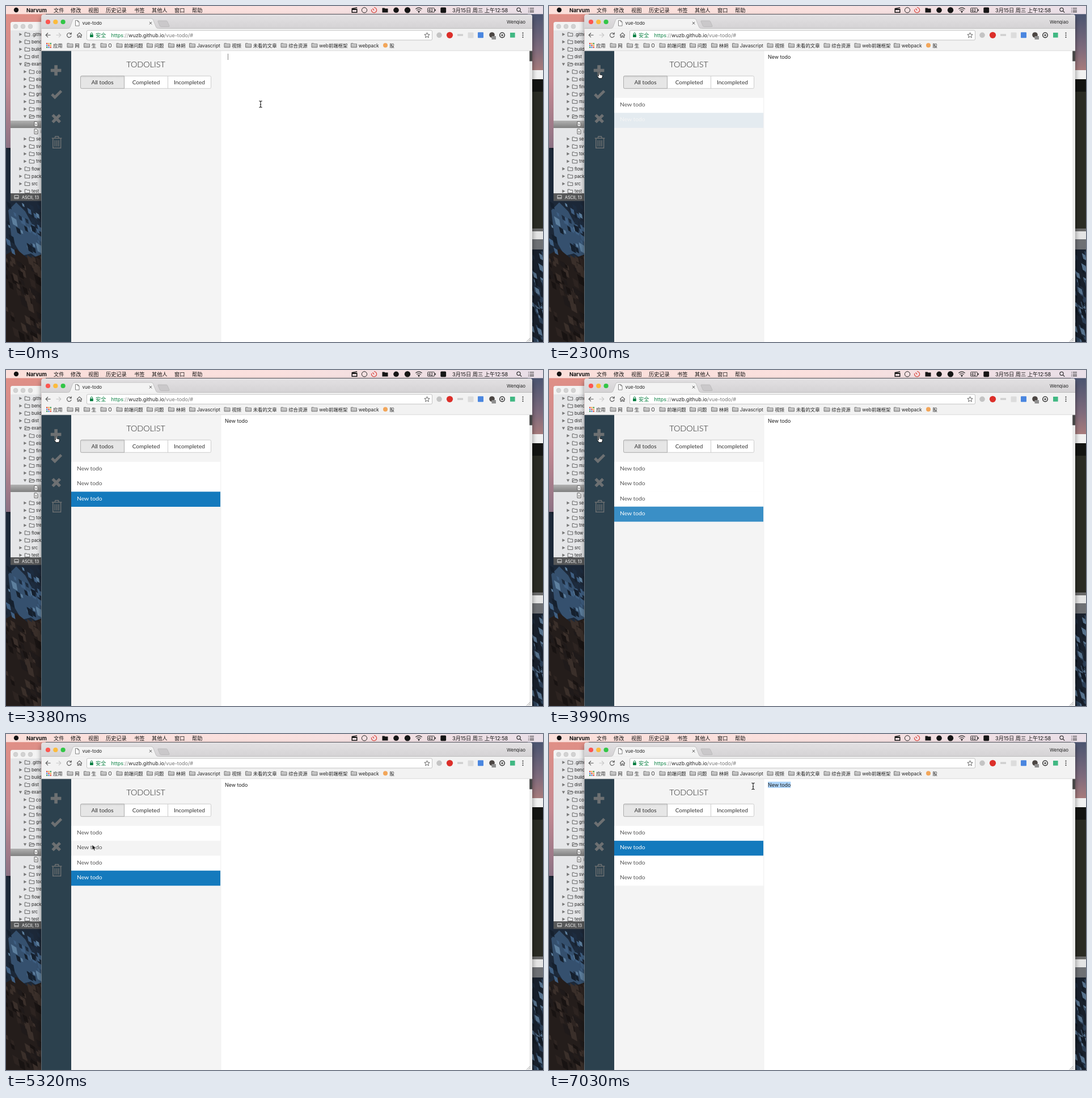
These frames come from a looping animation (947 by 592 pixels, 8 s). An HTML page:

```html
<!DOCTYPE html>
<html lang="zh">
<head>
<meta charset="utf-8">
<title>vue-todo</title>
<style>
html, body { margin: 0; width: 100%; height: 100%; overflow: hidden; background: #fff; }
svg { display: block; width: 947px; height: 592px; }
text { font-family: Inter, "Noto Sans CJK SC", "Noto Sans CJK", sans-serif; fill: #222; white-space: pre; }
.menu { font-size: 9.2px; fill: #111; }
.mark { font-size: 8.4px; }
.tree { font-size: 7.6px; fill: #222; }
.app { font-family: Lato, "Open Sans", sans-serif; font-size: 10.1px; fill: #333; }
.line { fill: none; stroke: #555; stroke-width: 1.1; }

/* every timeline spans the same 8 s loop */
.t { animation: 8s step-end infinite; }
#cursor { animation: path 8s linear infinite; }
#beam { animation-name: beam; }
#arrow { animation-name: arrow; }
#hand { animation-name: hand; }
#caret { animation-name: caret; }
#note { animation-name: note; }
#status { animation-name: status; }
#pick { animation-name: pick; }

@keyframes path {
  0% { transform: translate(449px, 173px); }
  1.5% { transform: translate(449px, 173px); animation-timing-function: steps(3, start); }
  6% { transform: translate(250px, 148px); animation-timing-function: steps(4, start); }
  12% { transform: translate(92.5px, 123.5px); animation-timing-function: steps(2, start); }
  15% { transform: translate(90px, 122px); }
  52.875% { transform: translate(90px, 122px); animation-timing-function: steps(3, start); }
  57.375% { transform: translate(121px, 159px); animation-timing-function: steps(4, start); }
  63.375% { transform: translate(126px, 183px); }
  66.5% { transform: translate(126px, 183px); animation-timing-function: step-start; }
  68% { transform: translate(152px, 195px); }
  69.5% { transform: translate(152px, 195px); animation-timing-function: steps(3, start); }
  74% { transform: translate(402px, 165px); }
  75.625% { transform: translate(402px, 165px); animation-timing-function: step-start; }
  77.125% { transform: translate(434px, 149px); animation-timing-function: steps(2, start); }
  80.125% { transform: translate(432px, 95px); }
  81.75% { transform: translate(432px, 95px); animation-timing-function: steps(3, start); }
  86.25% { transform: translate(372px, 93px); }
  87.875% { transform: translate(372px, 93px); animation-timing-function: step-start; }
  89.375%, 100% { transform: translate(360px, 92px); }
}
@keyframes beam { 0% { opacity: 1; } 3% { opacity: 0; } 72.5%, 100% { opacity: 1; } }
@keyframes arrow { 0% { opacity: 0; } 3% { opacity: 1; } 10.5% { opacity: 0; } 55.875% { opacity: 1; } 72.5%, 100% { opacity: 0; } }
@keyframes hand { 0% { opacity: 0; } 10.5% { opacity: 1; } 55.875%, 100% { opacity: 0; } }
@keyframes caret { 0% { opacity: 1; } 6% { opacity: 0; } 12% { opacity: 1; } 18.125%, 100% { opacity: 0; } }
@keyframes note { 0% { opacity: 0; } 18.125%, 100% { opacity: 1; } }
@keyframes status { 0% { opacity: 0; } 54.375% { opacity: 1; } 58.875% { opacity: 0; } 71% { opacity: 1; } 75.625%, 100% { opacity: 0; } }
@keyframes pick {
  0% { transform: translateX(42px); }
  81.75% { transform: translateX(26px); }
  83.25% { transform: translateX(6px); }
  84.75%, 100% { transform: translateX(0); }
}
/* rows fade in with an eased half second */
@keyframes add1 { 0% { opacity: 0; } 18.125% { opacity: .07; } 19.625% { opacity: .53; } 21.125% { opacity: .83; } 22.625% { opacity: .97; } 24.125%, 100% { opacity: 1; } }
@keyframes add2 { 0% { opacity: 0; } 28.75% { opacity: .07; } 30.25% { opacity: .53; } 31.75% { opacity: .83; } 33.25% { opacity: .97; } 34.75%, 100% { opacity: 1; } }
@keyframes add3 { 0% { opacity: 0; } 36.25% { opacity: .07; } 37.75% { opacity: .53; } 39.25% { opacity: .83; } 40.75% { opacity: .97; } 42.25%, 100% { opacity: 1; } }
@keyframes add4 { 0% { opacity: 0; } 46.875% { opacity: .07; } 48.375% { opacity: .53; } 49.875% { opacity: .83; } 51.375% { opacity: .97; } 52.875%, 100% { opacity: 1; } }
@keyframes on1 { 0% { opacity: 1; } 28.75%, 100% { opacity: 0; } }
@keyframes on2 { 0% { opacity: 1; } 36.25% { opacity: 0; } 69.5%, 100% { opacity: 1; } }
@keyframes on3 { 0% { opacity: 1; } 46.875%, 100% { opacity: 0; } }
@keyframes on4 { 0% { opacity: 1; } 69.5%, 100% { opacity: 0; } }
@keyframes hover2 { 0% { fill: #fff; } 55.875% { fill: #f4f4f4; } 69.5%, 100% { fill: #fff; } }
</style>
</head>
<body>
<svg viewBox="0 0 947 592">
  <defs>
    <linearGradient id="sky" x2="0" y2="1">
      <stop offset="0" stop-color="#e08f86"/><stop offset=".5" stop-color="#c58a92"/><stop offset="1" stop-color="#8c7284"/>
    </linearGradient>
    <linearGradient id="dusk" x2="0" y2="1">
      <stop offset="0" stop-color="#4a5470"/><stop offset=".6" stop-color="#7d6a7c"/><stop offset="1" stop-color="#a87c7c"/>
    </linearGradient>
    <linearGradient id="bar"><stop offset="0" stop-color="#fbdfda"/><stop offset=".5" stop-color="#fae0de"/><stop offset="1" stop-color="#e9dfe8"/></linearGradient>
    <linearGradient id="tabs" x2="0" y2="1"><stop offset="0" stop-color="#e3e1e3"/><stop offset="1" stop-color="#d4d2d4"/></linearGradient>
    <linearGradient id="focus" x2="0" y2="1"><stop offset="0" stop-color="#b2b2b2"/><stop offset="1" stop-color="#808080"/></linearGradient>
    <linearGradient id="press" x2="0" y2="1"><stop offset="0" stop-color="#d4d4d4"/><stop offset=".18" stop-color="#e6e6e6"/></linearGradient>
    <filter id="shade" x="-10%" y="-10%" width="120%" height="120%"><feDropShadow dx="0" dy="4" stdDeviation="5" flood-opacity=".45"/></filter>
    <clipPath id="side"><path d="M0 28H62.5V344H0z"/></clipPath>
    <g id="dir"><path d="M-4.3 3.2V-3.2H-1.2L-.2 -2H4.3V3.2z" fill="none" stroke="#555" stroke-width=".9"/></g>
    <g id="dirOpen"><path d="M-4.3 3V-3.2H-1.2L-.2 -2H3.6V-.6M-4.3 3L-2.6-.6H5.2L3.6 3z" fill="none" stroke="#555" stroke-width=".9"/></g>
    <g id="mdir"><path d="M-5 3.6V-3.4H-1.4L-.4-2.4H5V3.6z" fill="#bdbdbd" stroke="#6c6c6c" stroke-width=".9"/><path d="M-4.5-1.1H4.5" stroke="#eee" stroke-width=".7"/></g>
    <g id="file"><path d="M-3-4.3H1L3-2.3V4.3H-3z" fill="#f2f2f2" stroke="#555" stroke-width=".9"/><path d="M-1.5-.6L1.3 2M1.3-.6L-1.5 2" stroke="#666" stroke-width=".8"/></g>
  </defs>

  <!-- desktop -->
  <rect width="947" height="592" fill="#18202c"/>
  <rect y="14" width="70" height="236" fill="url(#sky)"/>
  <path d="M0 250L20 262 70 240V460H0z" fill="#1c2838"/>
  <path d="M4 360L18 346 34 362 50 392 62 410V448L44 436 28 440 10 410z" fill="#35506e"/>
  <path d="M0 438L18 428 40 446 62 438V592H0z" fill="#241d1b"/>
  <g id="rocks"></g>
  <rect x="920" y="14" width="27" height="100" fill="url(#dusk)"/>

  <!-- window behind, right -->
  <rect x="920" y="113" width="27" height="16" fill="#f1f1f1"/>
  <rect x="920" y="129" width="27" height="22" fill="#131412"/>
  <rect x="920" y="151" width="27" height="241" fill="#2a2b24"/>
  <rect x="920" y="392" width="27" height="5" fill="#6a6a6a"/>
  <rect x="920" y="397" width="27" height="14" fill="#e4e4e4"/>
  <rect x="920" y="411" width="27" height="18" fill="#6e7074"/>

  <!-- window behind, left -->
  <g clip-path="url(#side)">
    <path d="M8 343V32Q8 28 12 28H70V343z" fill="#e5e6e8"/>
    <path d="M8 43V32Q8 28 12 28H70V43z" fill="#f3f3f3"/>
    <g fill="#d2d2d2" stroke="#c2c2c2" stroke-width=".6"><circle cx="17" cy="36" r="3.9"/><circle cx="30" cy="36" r="3.9"/><circle cx="43" cy="36" r="3.9"/></g>
    <rect x="8" y="202" width="60" height="13" fill="url(#focus)"/>
    <g id="tree"></g>
    <rect x="8" y="330" width="60" height="13.5" fill="#575859"/>
    <path d="M15 333.5H22V339.5H15zM15 337.6H22" fill="none" stroke="#ddd" stroke-width=".9"/>
    <text x="28" y="339.6" style="font-size:7.2px;fill:#fff">ASCII, 13</text>
  </g>

  <!-- menu bar -->
  <rect width="947" height="14.3" fill="url(#bar)"/>
  <circle cx="18" cy="7" r="4.2" fill="#111"/>
  <text class="menu" x="36" y="10.5" font-weight="700">Narvum</text>
  <g id="menus"></g>
  <g fill="#151515">
    <path d="M609.5 5H619.5V12H609.5zM609.5 4L619 2.2 619.3 3.8 609.8 5.4z"/>
    <path d="M611 7H618V10.5H611z" fill="#f3dfe2"/>
    <circle cx="632" cy="7.3" r="4.6" fill="none" stroke="#222"/>
    <path d="M649 2.6A4.6 4.6 0 1 1 644.6 6M649 7.5L646.5 4.5" fill="none" stroke="#d8453e" stroke-width="1.2"/>
    <path d="M663.5 11.5V3.5H667.5L668.5 4.6H673.5V11.5z"/>
    <circle cx="688" cy="7.3" r="4.8"/>
    <circle cx="708" cy="7.3" r="5.2"/>
    <path d="M722.3 5.4Q728 .8 733.7 5.4M724.3 7.7Q728 4.8 731.7 7.7M726.2 9.7Q728 8.4 729.8 9.7" fill="none" stroke="#222" stroke-width="1.2"/>
    <circle cx="728" cy="11" r="1"/>
    <rect x="743.5" y="3.6" width="12" height="7.4" rx="1" fill="none" stroke="#222" stroke-width=".9"/>
    <path d="M756.4 5.8H757.8V8.8H756.4z"/>
    <text x="745" y="9.6" style="font-size:6.3px;font-weight:600">62</text>
    <rect x="766.3" y="2.4" width="9.8" height="9.8" rx="1.6"/>
    <circle cx="904" cy="6.3" r="3.1" fill="none" stroke="#222" stroke-width="1.1"/>
    <path d="M906.3 8.6L909.3 11.6M921 4H922M923.5 4H931M921 7.2H922M923.5 7.2H931M921 10.4H922M923.5 10.4H931" stroke="#222" stroke-width="1.1"/>
  </g>
  <text class="menu" x="787" y="10.5">3月15日 周三 上午12:58</text>

  <!-- browser window -->
  <path d="M62.5 592V19Q62.5 15 66.5 15H924Q928 15 928 19V592z" fill="#f2f2f2" filter="url(#shade)"/>
  <path d="M62.5 40V19Q62.5 15 66.5 15H924Q928 15 928 19V40z" fill="url(#tabs)"/>
  <path d="M62.5 39.5H928" stroke="#b9b9b9" stroke-width=".8"/>
  <path d="M108 40.3Q112 39.6 113 37L117.5 24.6Q118.6 22 121 22H256Q258.6 22 259.6 24.6L264.5 37Q265.6 39.6 270 40.3z" fill="#f3f3f3" stroke="#b4b4b4" stroke-width=".7"/>
  <rect x="108" y="39.8" width="162" height="2" fill="#f3f3f3"/>
  <path d="M268.5 26H282.5Q284 26 284.6 27.4L288 35.2Q288.4 36.4 287 36.4H273.4Q272 36.4 271.4 35L268 27.4Q267.6 26 268.5 26z" fill="#cac8ca" stroke="#b4b4b4" stroke-width=".7"/>
  <circle cx="74" cy="28" r="4.1" fill="#fc5650"/><circle cx="87.3" cy="28" r="4.1" fill="#fcbb3c"/><circle cx="100.6" cy="28" r="4.1" fill="#32c646"/>
  <path d="M122.5 25.5H126.5L129 28V35H122.5zM126.5 25.5V28H129" fill="#fff" stroke="#666" stroke-width=".8"/>
  <text x="134.5" y="33" style="font-size:8px">vue-todo</text>
  <path d="M252.8 28L257.2 32.4M257.2 28L252.8 32.4" stroke="#555"/>
  <text x="916" y="30.6" text-anchor="end" style="font-size:8px">Wenqiao</text>

  <path class="line" d="M78.5 51.3H70.5M74 47.5L70.2 51.3 74 55.1"/>
  <path class="line" d="M88.5 51.3H96.5M93 47.5L96.8 51.3 93 55.1" style="stroke:#c6c6c6"/>
  <path class="line" d="M114.6 49.2A3.9 3.9 0 1 0 115.2 52.4M115.2 46.6V49.8H112"/>
  <path class="line" d="M125 51.6L129.5 47.2 134 51.6M126.3 51V55.3H128.4V52.5H130.6V55.3H132.7V51"/>
  <rect x="142.5" y="43" width="609" height="17" rx="2" fill="#fff" stroke="#bdbdbd" stroke-width=".9"/>
  <rect x="148" y="50.2" width="5.8" height="4.8" rx=".6" fill="#0b8043"/>
  <path d="M149.2 50.5V49A1.7 1.7 0 0 1 152.6 49V50.5" fill="none" stroke="#0b8043"/>
  <text x="158" y="54.6" style="font-size:9.2px;fill:#0b8043">安全</text>
  <text x="185.5" y="54.6" style="font-size:9px"><tspan fill="#0b8043">https</tspan><tspan fill="#888">://</tspan>wuzb.github.io<tspan fill="#777">/vue-todo/#</tspan></text>
  <path d="M742.5 46.8L743.8 50 747.2 50.2 744.6 52.4 745.4 55.7 742.5 53.9 739.6 55.7 740.4 52.4 737.8 50.2 741.2 50z" fill="none" stroke="#555" stroke-width=".9"/>
  <circle cx="764" cy="51.3" r="4.8" fill="#c4c4c4"/>
  <circle cx="782.5" cy="51.3" r="5.6" fill="#dc2f2a"/>
  <rect x="796" y="49.4" width="10" height="3.4" fill="#cfcfcf"/>
  <rect x="814.5" y="46.5" width="10" height="10" rx="1" fill="#dcdcdc"/>
  <rect x="832" y="46.2" width="10" height="10" rx="1" fill="#4a86e0"/>
  <circle cx="857" cy="51" r="4.8" fill="#4b4542"/><rect x="856.5" y="53" width="7.5" height="6" fill="#8f8f8f"/>
  <circle cx="875" cy="51.3" r="4.3" fill="none" stroke="#444" stroke-width="1.6"/><circle cx="875" cy="51.3" r="1.6" fill="#444"/>
  <rect x="889" y="47" width="8.6" height="8.6" fill="#41b883"/>
  <g fill="#444"><circle cx="911.5" cy="47.7" r="1.1"/><circle cx="911.5" cy="51.3" r="1.1"/><circle cx="911.5" cy="54.9" r="1.1"/></g>

  <g id="marks"></g>
  <path d="M62.5 79H928" stroke="#c3c3c3" stroke-width=".8"/>

  <!-- page -->
  <rect x="62.5" y="79.3" width="52.5" height="512.7" fill="#2c414e"/>
  <rect x="115" y="79.3" width="263.8" height="512.7" fill="#f4f4f4"/>
  <rect x="378.8" y="79.3" width="544.4" height="512.7" fill="#fff"/>
  <path d="M379 79.3V592" stroke="#ececec" stroke-width=".6"/>
  <rect x="923.2" y="79.3" width="4.8" height="512.7" fill="#ececec"/>
  <rect x="923.2" y="79.3" width="4.8" height="18" fill="#464646"/>
  <path d="M918 591.5L924.5 585M921 591.5L924.5 588" stroke="#888" stroke-width=".8"/>
  <g fill="#6d7072">
    <path d="M85.3 104.2H90.9V110.8H97.4V116.2H90.9V122.6H85.3V116.2H78.8V110.8H85.3z"/>
    <path d="M79.2 157.2L82.6 153.8 86.2 157.4 95.8 147.9 99.2 151.3 86.2 164.3z"/>
    <path d="M84 190.2L88.7 194.8 93.4 190.2 97 193.8 92.4 198.3 97 202.9 93.4 206.5 88.7 201.9 84 206.5 80.4 202.9 85 198.3 80.4 193.8z"/>
  </g>
  <path d="M80.8 233H98.4M86.2 232.6L87 229.8H92.4L93.2 232.6M82.8 233.6V250.2H96.6V233.6M86.4 236.6V247.4M89.7 236.6V247.4M93 236.6V247.4" fill="none" stroke="#6d7072" stroke-width="1.5"/>

  <text class="app" x="246.5" y="108.4" text-anchor="middle" style="font-size:14.4px;font-weight:300;fill:#222">TODOLIST</text>
  <rect x="131.5" y="123.3" width="230" height="22" rx="2" fill="#fff" stroke="#ccc"/>
  <path d="M285.5 123.3V145.3" stroke="#ccc"/>
  <path d="M208.5 123.3V145.3H133.5Q131.5 145.3 131.5 143.3V125.3Q131.5 123.3 133.5 123.3z" fill="url(#press)" stroke="#adadad"/>
  <g text-anchor="middle">
    <text class="app" x="170" y="137.7">All todos</text>
    <text class="app" x="247" y="137.7">Completed</text>
    <text class="app" x="323.4" y="137.7">Incompleted</text>
  </g>
  <g id="rows"></g>

  <path id="caret" class="t" d="M391.5 84V95" stroke="#777" stroke-width=".9"/>
  <svg x="386" y="84" width="40.3" height="11" viewBox="0 0 40.3 11" style="width:40.3px;height:11px"><rect id="pick" class="t" width="40.3" height="11" fill="#add4f9"/></svg>
  <text id="note" class="t" x="386" y="92.8" style="font-size:8.9px">New todo</text>

  <g id="status" class="t">
    <path d="M62.5 580.5H348Q349.5 580.5 349.5 582V592H62.5z" fill="#ececec" stroke="#b5b5b5" stroke-width=".9"/>
    <text x="65" y="588.8" style="font-size:7.25px;fill:#444">https://wuzb.github.io/vue-todo/#</text>
  </g>

  <g id="cursor">
    <path id="beam" class="t" d="M-2.6-5.6Q0-5.6 0-4V4Q0 5.6-2.6 5.6M2.6-5.6Q0-5.6 0-4V4Q0 5.6 2.6 5.6M-1.2.8H1.2" fill="none" stroke="#222" stroke-width="1.1"/>
    <path id="arrow" class="t" d="M0 0V9.2L2.1 7.3 3.6 10.6 5.2 9.9 3.8 6.7H6.6z" fill="#111" stroke="#fff" stroke-width=".7"/>
    <path id="hand" class="t" d="M-2.6-4.6Q-1.6-5.8-.6-4.6V-1.2L3.2-.4Q4.6 0 4.4 1.6L3.4 5.6H-1.8L-4.8 1.6Q-4.6.2-3.4.8L-2.6 1.6z" fill="#fff" stroke="#111" stroke-width=".9"/>
  </g>
</svg>
<script>
const put = (id, html) => { document.getElementById(id).innerHTML = html; };
const label = (cls, x, y, s) => `<text class="${cls}" x="${x}" y="${y}">${s}</text>`;
const icon = (id, x, y) => `<use href="#${id}" x="${x}" y="${y}"/>`;

// rough mountain texture from slanted shards
let seed = 7;
const rand = () => (seed = seed * 16807 % 2147483647) / 2147483647;
const shards = (n, x, y, w, h, size, tones) => Array.from({ length: n }, () => {
  const a = x + rand() * w, b = y + rand() * h, s = size * (.5 + rand());
  return `<path d="M${a} ${b}l${s * .8} ${s * .5} ${s * .2} ${s * 1.1} ${-s * .7} ${-s * .4}z" fill="${tones[rand() * tones.length | 0]}"/>`;
}).join('');
put('rocks', shards(45, -4, 344, 64, 84, 8, ['#15202e', '#1d2c3f', '#3f5f82', '#5d7f9e'])
  + shards(80, -6, 436, 68, 150, 10, ['#181312', '#2d2421', '#3a2f2a', '#1f1a1a'])
  + shards(70, 922, 428, 26, 160, 7, ['#121a25', '#1e2b3c', '#2b3e55', '#56718c']));

put('menus', [[84, '文件'], [114, '修改'], [145, '视图'], [176, '历史记录'], [226, '书签'], [257, '其他人'], [297, '窗口'], [328, '帮助']]
  .map(([x, s]) => label('menu', x, 10.5, s)).join(''));

// bookmarks
const folders = [[113, '网'], [142.5, '生'], [172, 'O'], [200, '前端问题'], [253.5, '问题'], [291.5, '林朔'], [328.5, 'Javascript'],
  [390, '视频'], [427.5, '未看的文章'], [490, '综合资源'], [544, 'web前端框架'], [613.5, 'webpack']];
const hues = ['#e0453a', '#f2a73b', '#3f9b53', '#4a86e0'];
let marks = label('mark', 83, 72.6, '应用') + label('mark', 676.5, 72.6, '股') + '<circle cx="669" cy="69.3" r="4" fill="#f2a65a"/>';
for (let i = 0; i < 9; i++)
  marks += `<rect x="${71 + i % 3 * 3.3}" y="${65 + (i / 3 | 0) * 3.3}" width="2.3" height="2.3" fill="${hues[i % 4]}"/>`;
for (const [x, s] of folders) marks += icon('mdir', x, 69.3) + label('mark', x + 8.2, 72.6, s);
put('marks', marks);

// file tree: leading dashes give depth, * marks an open folder, ! a file
const names = '.github,benchmarks,build,dist,*examples,-commits,-elastic,-firebase,-grid,-markdown,-modal,-*move,-!,-!index,-select2,-svg,-todomvc,-tree,flow,packages,src,test';
put('tree', names.split(',').map((s, i) => {
  const y = 50 + i * 13.16, x = s[0] === '-' ? 8 : 0;
  const open = s.includes('*'), name = s.replace(/[-*!]/g, '');
  if (s.includes('!')) return icon('file', 53, y) + label('tree', 61, y + 2.7, name);
  const tip = open ? `M${22.8 + x} ${y - 2.2}h5.4l-2.7 4.8z` : `M${23.4 + x} ${y - 2.8}v5.6l5-2.8z`;
  return `<path d="${tip}" fill="#777"/>` + icon(open ? 'dirOpen' : 'dir', 37.5 + x, y) + label('tree', 45 + x, y + 2.7, name);
}).join(''));

// todo rows
put('rows', [1, 2, 3, 4].map(n => {
  const y = 161.8 + (n - 1) * 26.3;
  const box = rest => `<rect x="115" y="${y}" width="263" height="26.6" ${rest}/>`;
  const name = fill => `<text class="app" x="125" y="${y + 15.3}" style="font-size:10.3px;fill:${fill}">New todo</text>`;
  return `<g class="t" style="animation-name:add${n}">`
    + box(n === 2 ? 'class="t" style="animation-name:hover2"' : 'fill="#fff"') + name('#555')
    + `<g class="t" style="animation-name:on${n}">${box('fill="#147abd"')}${name('#fff')}</g></g>`;
}).join(''));
</script>
</body>
</html>
```
